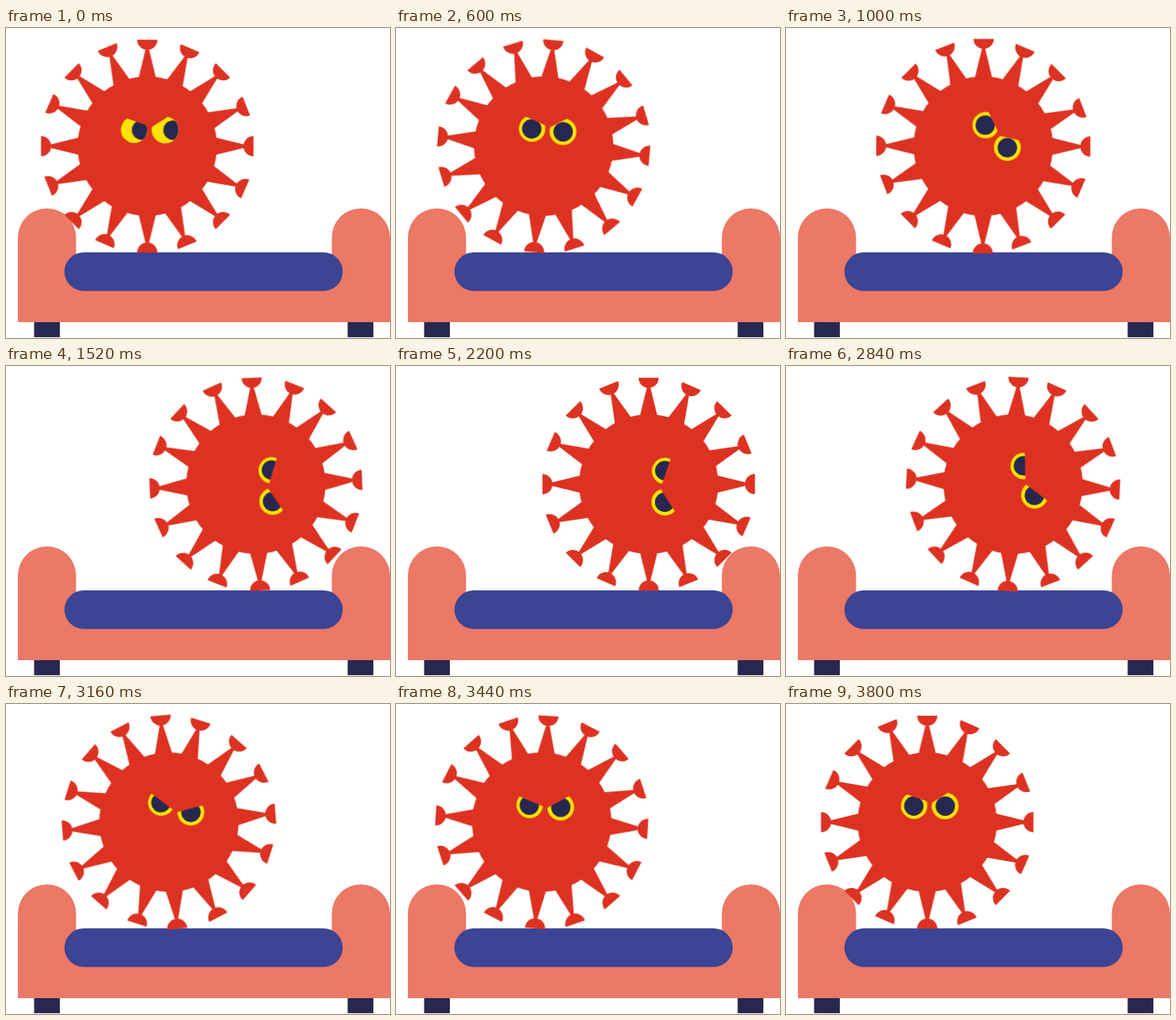
Recreate the animation shown at these times as an HTML page. Size 485 by 391 pixels, loop 4 s.

```html
<!DOCTYPE html>
<html lang="en">
<head>
<meta charset="utf-8">
<title>Virus on a bed</title>
<style>
  html, body { margin: 0; width: 100%; height: 100%; overflow: hidden; background: #fff; }
  svg { display: block; width: 485px; height: 391px; }

  .red { fill: #dd3221; }
  .salmon { fill: #ec7866; }
  .blue { fill: #3c4494; }
  .navy { fill: #27284f; }
  .yellow { fill: #ffe300; }

  .virus { animation: roll 4s infinite; }
  .pupil { animation: look 4s infinite; }
  .brow { animation: frown 4s infinite; }

  @keyframes roll {
    0% { transform: translate(178.4px, 149px) rotate(0deg); }
    4.5% {
      transform: translate(178.4px, 149px) rotate(0deg);
      animation-timing-function: cubic-bezier(.75, 0, .25, 1);
    }
    45.5% { transform: translate(319.2px, 149px) rotate(90deg); }
    54.125% {
      transform: translate(319.2px, 149px) rotate(90deg);
      animation-timing-function: cubic-bezier(.75, 0, .25, 1);
    }
    95.125%, 100% { transform: translate(178.4px, 149px) rotate(0deg); }
  }

  /* The glance snaps back to the side when the loop restarts. */
  @keyframes look {
    0% { transform: translateX(9.7px); animation-timing-function: ease-in-out; }
    10%, 100% { transform: translateX(0); }
  }

  @keyframes frown {
    0%, 26% { transform: translateY(0); animation-timing-function: ease-in-out; }
    37%, 81% { transform: translateY(9.4px); animation-timing-function: ease-in-out; }
    93%, 100% { transform: translateY(0); }
  }
</style>
</head>
<body>
<svg viewBox="0 0 485 391">
  <defs>
    <clipPath id="left-eye"><circle cx="-16.6" cy="-20.7" r="16.7"/></clipPath>
    <clipPath id="right-eye"><circle cx="22.6" cy="-20.4" r="17"/></clipPath>
  </defs>

  <g class="bed">
    <path class="navy" d="M35.5 368h32.5v22h-32.5zM431.5 368h32.5v22h-32.5z"/>
    <path class="salmon" d="M15 371V264.3a36.75 36.75 0 0 1 73.5 0V307H411.5V264.3a36.75 36.75 0 0 1 73.5 0V371z"/>
    <rect class="blue" x="73.8" y="283" width="351.5" height="48.7" rx="24.35"/>
  </g>

  <g class="virus">
    <path class="red" id="spikes"/>
    <circle class="red" r="88"/>
    <g clip-path="url(#left-eye)">
      <circle class="yellow" cx="-16.6" cy="-20.7" r="18"/>
      <circle class="navy pupil" cx="-17" cy="-20.4" r="12.3"/>
    </g>
    <g clip-path="url(#right-eye)">
      <circle class="yellow" cx="22.6" cy="-20.4" r="18.2"/>
      <circle class="navy pupil" cx="22.8" cy="-20.2" r="12.3"/>
    </g>
    <path class="red brow" d="M-38 -39.2L1 -25.8V-60H-38z"/>
    <path class="red brow" d="M3 -22.4L41 -46.4V-60H3z"/>
  </g>
</svg>
<script>
  const CAP = 12.8;
  // Angle and reach of the four spikes in each quarter turn.
  const QUARTER = [[0, 134.2], [23.6, 135], [45, 135.2], [68, 135]];

  // Each spike is a thin triangle with a half-disc on its tip, flat side out.
  function spike(deg, end) {
    const a = deg * Math.PI / 180;
    const at = (side, r) =>
      `${(r * Math.sin(a) + side * Math.cos(a)).toFixed(2)} ${(side * Math.sin(a) - r * Math.cos(a)).toFixed(2)}`;
    return `M${at(-11.5, 84)}L${at(-1, 127)}L${at(1, 127)}L${at(11.5, 84)}z` +
      `M${at(-CAP, end)}L${at(CAP, end)}A${CAP} ${CAP} 0 0 1 ${at(-CAP, end)}z`;
  }

  const path = [0, 90, 180, 270]
    .flatMap(turn => QUARTER.map(([deg, end]) => spike(turn + deg, end)))
    .join('');
  document.getElementById('spikes').setAttribute('d', path);
</script>
</body>
</html>
```
